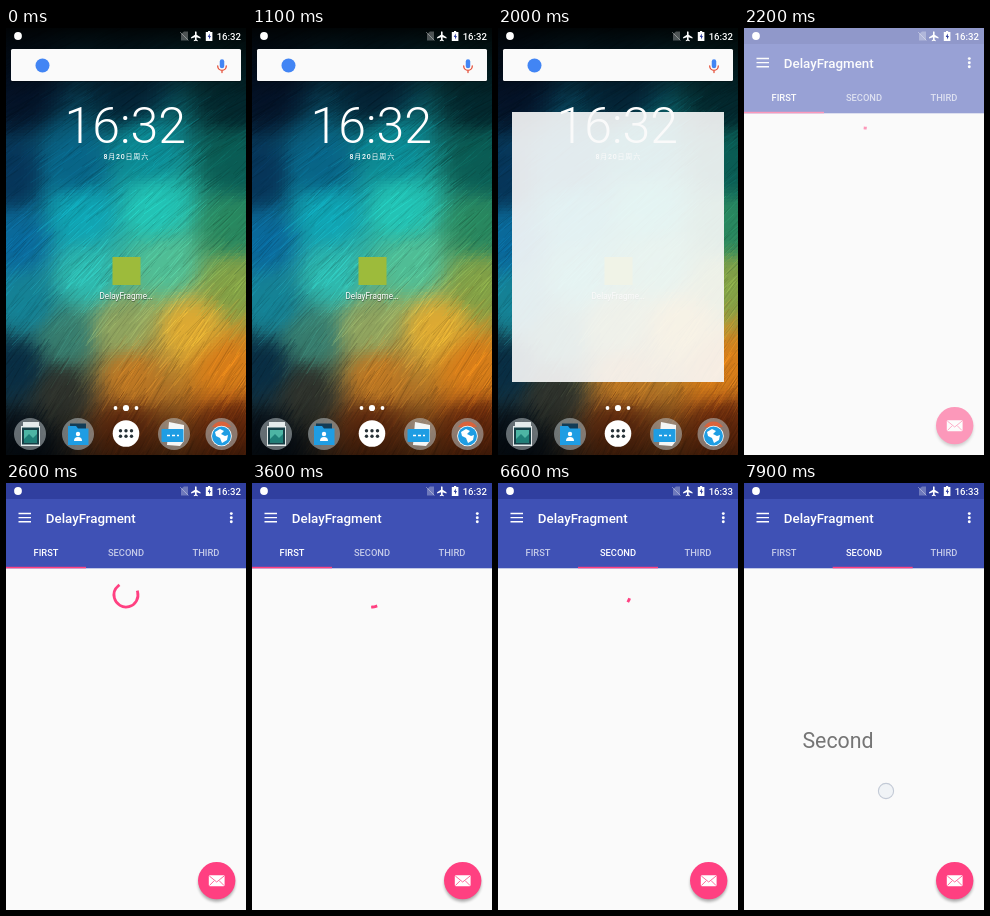
An HTML page with a canvas for the animation above (8 s loop, 240x427 px).

```html
<!DOCTYPE html>
<html lang="en">
<head>
<meta charset="utf-8">
<title>DelayFragment</title>
<style>
  html, body { margin: 0; width: 100%; height: 100%; overflow: hidden; background: #fafafa; }
  canvas, svg { position: absolute; inset: 0; width: 100%; height: 100%; display: block; }
  text { font-family: Roboto, sans-serif; }
  .mid { text-anchor: middle; }
  .white { fill: #fff; }
  .tab { font-size: 9.33px; font-weight: 500; text-anchor: middle; fill: #fff; fill-opacity: .7; }
  .tab.on { fill-opacity: 1; }
  .label { font-size: 21.33px; fill: #757575; text-anchor: middle; }
  .date { font: 500 7px Roboto, 'Noto Sans CJK SC', 'Noto Sans CJK', sans-serif; letter-spacing: .8px; }
  .spin { fill: none; stroke: #ff4081; stroke-width: 2.8; stroke-linecap: square; }
  .plate { fill: #c4cdd2; fill-opacity: .5; }
  .blue { fill: #1f9de3; }
</style>
</head>
<body>
<canvas id="wall" width="240" height="427"></canvas>
<svg viewBox="0 0 240 427" preserveAspectRatio="none">
  <defs>
    <filter id="soft" x="-30%" y="-30%" width="160%" height="160%"><feGaussianBlur stdDeviation="1.8"/></filter>
  </defs>

  <g id="home">
    <rect x="5" y="22" width="230" height="32" rx="1.5" fill="#000" opacity=".3"/>
    <rect x="5" y="21" width="230" height="32" rx="1.5" fill="#fafafa"/>
    <circle cx="36.5" cy="37.5" r="7" fill="#4285f4"/>
    <g fill="none" stroke-linecap="round">
      <path d="M216 33.5v4.500" stroke="#4285f4" stroke-width="4.500"/>
      <path d="M211.700 38a4.300 4.300 0 0 0 8.600 0M216 42.500v2" stroke="#e5533d" stroke-width="1.300"/>
    </g>
    <text class="mid white" x="119.300" y="115.300" font-size="50" font-weight="300">16:32</text>
    <text class="mid white date" x="120.200" y="131.300">8月20日周六</text>
    <rect x="106.5" y="229" width="28" height="28" fill="#9dbb3b"/>
    <text class="mid" x="120.4" y="271.5" font-size="8.2" fill="#000" opacity=".4">DelayFragme…</text>
    <text class="mid white" x="120" y="271" font-size="8.2">DelayFragme…</text>
    <g class="white">
      <circle cx="109.5" cy="380" r="1.9"/><circle cx="120" cy="380" r="3.1"/><circle cx="130.5" cy="380" r="1.9"/>
    </g>
    <g class="plate">
      <circle cx="24" cy="406" r="16"/><circle cx="72" cy="406" r="16"/>
      <circle cx="168" cy="406" r="16"/><circle cx="215.5" cy="406" r="16"/>
    </g>
    <path fill="#e6ecec" d="M17 394h16v4h1v20H15V398h2z"/>
    <rect x="16" y="399.500" width="17" height="17" fill="#173f46"/>
    <rect x="18" y="402" width="13" height="12.500" fill="#4db5a4"/>
    <path d="M18 414.500V411l5-5 4 4 4-4v8.500z" fill="#1f7f78"/>
    <path fill="#123c56" d="M64 395.500h16v6H64z"/>
    <path class="blue" d="M62 398h8l2 2.500h10.500v16.500H62z"/>
    <circle class="white" cx="72" cy="406" r="2.2"/><path class="white" d="M68 413a4 4 0 0 1 8 0z"/>
    <circle class="white" cx="120" cy="405.5" r="13.3"/>
    <g fill="#263238" id="grid"></g>
    <path fill="#f4f6f6" d="M163 394l15 3v16l-4 5-13-1z"/>
    <rect class="blue" x="155.500" y="401" width="22" height="13" rx="1"/>
    <path d="M161 407.500h3m2 0h3m2 0h2" stroke="#fff" stroke-width="1.6"/>
    <path fill="#d9633c" d="M206 399a11 11 0 0 1 19 0z"/>
    <circle class="white" cx="215.5" cy="408" r="10.3"/>
    <circle class="blue" cx="215.5" cy="408" r="9.500"/>
    <path class="white" d="M209 404l5-3 4 2-3 3 4 2 3-1-1 5-5 3-2-5-4-2z"/>
  </g>

  <rect id="win" fill="#fafafa"/>

  <g id="app">
    <rect y="85" width="240" height="342" fill="#fafafa"/>
    <g id="pager">
      <text class="label" id="label0" x="120" y="264.5">First</text>
      <text class="label" id="label1" x="360" y="264.5">Second</text>
      <circle class="spin" id="spin0" cx="120" cy="112" r="12" pathLength="360"/>
      <circle class="spin" id="spin1" cx="360" cy="112" r="12" pathLength="360"/>
    </g>
    <rect width="240" height="85.3" fill="#3f51b5"/>
    <rect width="240" height="16" fill="#303f9f"/>
    <path d="M12.5 30.5h12.5M12.5 34.6h12.5M12.5 38.7h12.5" stroke="#fff" stroke-width="1.4"/>
    <text class="white" x="39.8" y="39.7" font-size="13.33" font-weight="500">DelayFragment</text>
    <g class="white">
      <circle cx="225.3" cy="30.6" r="1.45"/><circle cx="225.3" cy="34.7" r="1.45"/><circle cx="225.3" cy="38.8" r="1.45"/>
    </g>
    <text class="tab" x="40" y="73">FIRST</text>
    <text class="tab" x="120" y="73">SECOND</text>
    <text class="tab" x="200" y="73">THIRD</text>
    <rect id="bar" y="83.8" width="80" height="1.5" fill="#ff4081"/>
    <circle cx="210.7" cy="400.3" r="18.4" opacity=".32" filter="url(#soft)"/>
    <circle cx="210.7" cy="397.6" r="18.7" fill="#ff4081"/>
    <rect class="white" x="202.8" y="392.2" width="15.8" height="11" rx="1.2"/>
    <path d="M203.3 393l7.4 6 7.4-6M203.3 402.6l5-5M218.1 402.6l-5-5" fill="none" stroke="#ff6a9c" stroke-width="1"/>
  </g>

  <circle id="touch" r="7.6" fill="#e9eef4" fill-opacity=".6" stroke="#c3cad6" stroke-width="1.1"/>

  <g class="white">
    <circle cx="12" cy="8" r="3.9"/>
    <path d="M175 6l3-2.5h4v9h-7z" opacity=".3"/>
    <path d="M174 4l8.5 8.5" stroke="#fff" stroke-width=".9" opacity=".4"/>
    <path d="M189 4q.8-1.4 1.6 0v2.8l3.9 2.4v1.2l-3.9-1.2v2.3l1.2 1v.8l-2-.5-2 .5v-.8l1.2-1V9.2l-3.9 1.2V9.2l3.9-2.4z"/>
    <path d="M202 3h2.200v1h2.200v9h-6.600v-9h2.200z"/>
    <path d="M203.800 5.500l-2.100 3.400h1.300v2.600l2-3.400h-1.200z" fill="#303f9f"/>
    <text id="clock" x="235" y="11.5" font-size="9.6" font-weight="500" text-anchor="end">16:32</text>
  </g>
</svg>

<script>
const LOOP = 8000, STEP = 100;
const $ = id => document.getElementById(id);
const set = (id, attrs) => {
  for (const k in attrs) $(id).setAttribute(k, attrs[k]);
};
const show = (id, on) => set(id, { visibility: on ? 'visible' : 'hidden' });

// anchor colours of the wallpaper: x, y, rgb
const PAINT = [
  [10, 65, 4, 18, 38], [120, 65, 4, 34, 52], [230, 70, 3, 38, 44],
  [5, 150, 6, 52, 88], [70, 140, 8, 100, 135], [140, 125, 12, 138, 148], [230, 135, 10, 92, 84],
  [10, 215, 10, 105, 155], [75, 185, 16, 165, 180], [150, 180, 35, 196, 182], [228, 200, 40, 135, 95],
  [20, 275, 20, 130, 150], [80, 250, 45, 185, 175], [160, 238, 80, 190, 150], [228, 255, 130, 160, 70],
  [10, 340, 8, 44, 66], [60, 310, 55, 125, 110], [115, 300, 145, 165, 95], [185, 300, 222, 170, 50],
  [55, 365, 45, 48, 42], [125, 350, 190, 120, 35], [220, 340, 215, 125, 25],
  [15, 415, 8, 18, 28], [120, 400, 110, 48, 16], [225, 400, 120, 48, 14]
];

// distance-weighted mix of the anchors
function hue(x, y) {
  let sum = 0, rgb = [0, 0, 0];
  for (const [px, py, ...c] of PAINT) {
    const w = ((x - px) ** 2 + (y - py) ** 2 + 250) ** -2;
    sum += w;
    rgb = rgb.map((v, i) => v + c[i] * w);
  }
  return rgb.map(v => Math.round(v / sum));
}

function paintWall() {
  const c = $('wall').getContext('2d');
  let seed = 7;
  const rnd = () => (seed = seed * 16807 % 2147483647) / 2147483647;

  for (let y = 0; y < 427; y += 3) {
    for (let x = 0; x < 240; x += 3) {
      c.fillStyle = `rgb(${hue(x + 1.5, y + 1.5)})`;
      c.fillRect(x, y, 3, 3);
    }
  }

  // brush hairs, steeper towards the bottom, carrying nearby paint
  c.lineWidth = .9;
  for (let i = 0; i < 3500; i++) {
    const x = rnd() * 270 - 15, y = rnd() * 440;
    const len = 6 + rnd() * 16, a = -.35 - y / 700 - rnd() * .25;
    const dx = len * Math.cos(a), dy = len * Math.sin(a);
    const light = .72 + rnd() * .56;
    c.strokeStyle = `rgba(${hue(x, y).map(v => Math.min(255, Math.round(v * light)))},.5)`;
    c.beginPath();
    c.moveTo(x - dx, y - dy);
    c.lineTo(x + dx, y + dy);
    c.stroke();
  }

  const shade = (y0, y1, a) => {
    const g = c.createLinearGradient(0, y0, 0, y1);
    g.addColorStop(0, `rgba(0,0,0,${a})`);
    g.addColorStop(1, 'rgba(0,0,0,0)');
    c.fillStyle = g;
    c.fillRect(0, Math.min(y0, y1), 240, Math.abs(y1 - y0));
  };
  shade(0, 70, .9);
  shade(427, 370, .5);
}

// ease through control points (x0,0) (x1,0) (x2,1) (x3,1)
function ease(x, x0, x1, x2, x3) {
  if (x <= x0) return 0;
  if (x >= x3) return 1;
  let lo = 0, hi = 1;
  for (let i = 0; i < 24; i++) {
    const m = (lo + hi) / 2, n = 1 - m;
    const v = n * n * n * x0 + 3 * n * n * m * x1 + 3 * n * m * m * x2 + m * m * m * x3;
    if (v < x) lo = m; else hi = m;
  }
  return lo * lo * (3 - 2 * lo);
}

function drawSpinner(id, age, on) {
  show(id, on);
  if (!on) return;
  const p = age % 1333 / 1333;
  const tail = 270 * ease(p, .5, .7, .6, 1);
  const head = 270 * ease(p, 0, .2, .1, .5);
  const angle = age / 6665 * 720 + 90 * p + tail - 90;
  const el = $(id);
  set(id, {
    'stroke-dasharray': `${Math.max(.01, head - tail)} 720`,
    transform: `rotate(${angle} ${el.getAttribute('cx')} 112)`
  });
}

const SPIN = [2170, 5405];
const DELAY = 2000;
const DRAGS = [
  { at: 4500, x: 173, y: 298, held: 6, path: [0, 2, 28, 70, 115, 158, 195, 222, 236, 240] },
  { at: 7700, x: 179, y: 308, held: 6, path: [0, 2, 26] }
];
const FADE = { 2100: .15, 2200: .52, 2300: .85 };
const REVEAL = { 1900: [68, 209, 104, 67, .77], 2000: [14, 84, 212, 270, .9] };

function draw(t) {
  const home = t < 2100;
  const box = REVEAL[t] || [0, 0, 240, 427, 1];
  $('wall').style.visibility = home ? 'visible' : 'hidden';
  show('home', home);
  show('win', t >= 1900);
  set('win', { x: box[0], y: box[1], width: box[2], height: box[3], opacity: box[4] });
  set('app', { opacity: home ? 0 : FADE[t] || 1 });

  let offset = 0, touch = null;
  DRAGS.forEach((d, n) => {
    const i = (t - d.at) / STEP;
    if (i < 0) return;
    const moved = d.path[Math.min(i, d.path.length - 1)];
    offset = n * 240 + moved;
    touch = i < d.held ? [d.x - moved - (i ? 11 : 0), d.y] : null;
  });
  set('pager', { transform: `translate(${-offset} 0)` });
  set('bar', { x: offset / 3 });
  show('touch', touch);
  if (touch) set('touch', { cx: touch[0], cy: touch[1] });

  SPIN.forEach((start, n) => {
    const age = Math.max(0, t - start);
    const ready = t >= start + DELAY - 10;
    drawSpinner('spin' + n, age, t > start - 10 && !ready);
    show('label' + n, ready);
  });

  const page = t >= 5000 ? 1 : 0;
  document.querySelectorAll('.tab').forEach((el, i) => el.classList.toggle('on', i === page));
  $('clock').textContent = t >= 5900 ? '16:33' : '16:32';
}

for (let i = 0; i < 6; i++) {
  const dot = document.createElementNS('http://www.w3.org/2000/svg', 'circle');
  const at = { cx: 114.5 + i % 3 * 5.5, cy: i < 3 ? 402.8 : 408.3, r: 1.7 };
  for (const k in at) dot.setAttribute(k, at[k]);
  $('grid').append(dot);
}
paintWall();

const begin = performance.now();
let last = -1;
function tick() {
  const t = Math.floor((performance.now() - begin) / STEP + .2) * STEP % LOOP;
  if (t !== last) draw(last = t);
  requestAnimationFrame(tick);
}
tick();
</script>
</body>
</html>
```
